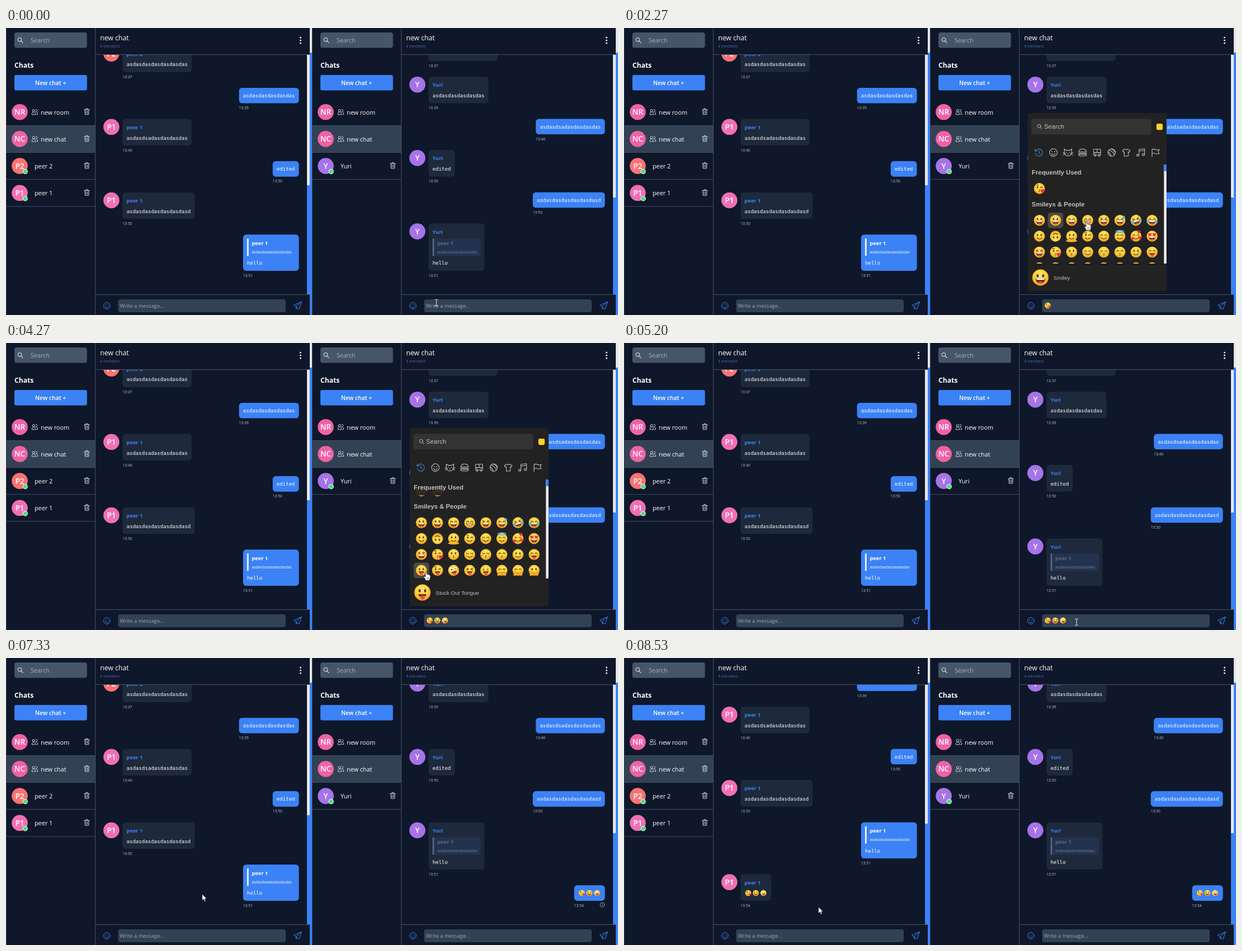
These frames come from a looping animation (1092x513 px, 9990 ms). An HTML page:

```html
<!DOCTYPE html>
<html lang="en">
<head>
<meta charset="utf-8">
<title>Group chat</title>
<style>
html, body { margin: 0; width: 100%; height: 100%; overflow: hidden; background: #0f172a; }
svg { display: block; width: 100vw; height: 100vh; }
text { font-family: "Open Sans", "Noto Sans", sans-serif; white-space: pre; }
.mono { font-family: "DejaVu Sans Mono", "Noto Sans Mono", monospace; }
.arial { font-family: "Liberation Sans", Arial, sans-serif; }
.b { font-weight: 700; }
.sb { font-weight: 600; }
.mid { text-anchor: middle; }
.ln { fill: none; stroke-linecap: round; stroke-linejoin: round; }
</style>
</head>
<body>
<svg id="stage" viewBox="0 0 1092 513">
  <defs>
    <radialGradient id="skin" cx=".5" cy=".35" r=".68">
      <stop offset="0" stop-color="#ffe96c"/><stop offset=".6" stop-color="#ffcb35"/><stop offset="1" stop-color="#ee9716"/>
    </radialGradient>
    <clipPath id="feedClip"><rect x="160" y="48" width="377" height="428"/></clipPath>
    <clipPath id="gridClip"><rect x="720" y="244" width="243" height="177"/></clipPath>
    <g id="faces"></g>
  </defs>
  <g id="shell"></g>
  <g id="left"></g>
  <g id="right" transform="translate(546)"></g>
  <g id="draft"></g>
  <g id="picker"></g>
  <g id="cursor"></g>
</svg>
<script>
const LOOP = 9990, STEP = 66.6;
const BLUE = '#3b82f6', LINE = '#475569', GREY = '#c0c0c0', BROWN = '#5a3416';
const $ = id => document.getElementById(id);
const many = (n, fn) => Array.from({ length: n }, (_, i) => fn(i)).join('');

const rect = (x, y, w, h, fill, r = 0) =>
  `<rect x="${x}" y="${y}" width="${w}" height="${h}" rx="${r}" fill="${fill}"/>`;
const disc = (x, y, r, fill, more = '') => `<circle cx="${x}" cy="${y}" r="${r}" fill="${fill}" ${more}/>`;
const oval = (x, y, rx, ry, fill = BROWN, more = '') =>
  `<ellipse cx="${x}" cy="${y}" rx="${rx}" ry="${ry}" fill="${fill}" ${more}/>`;
const text = (x, y, s, size, fill = '#fff', cls = '') =>
  `<text x="${x}" y="${y}" font-size="${size}" fill="${fill}" class="${cls}">${s}</text>`;
const line = (d, color = BROWN, w = 1.2) =>
  `<path class="ln" d="${d}" stroke="${color}" stroke-width="${w}"/>`;
const fill = (d, color) => `<path d="${d}" fill="${color}"/>`;
const at = (x, y, html, s = 1) => `<g transform="translate(${x} ${y}) scale(${s})">${html}</g>`;
const heart = (x, y, s) => at(x, y, fill('M0 3.4C-6-1-2.6-5 0-1.9C2.6-5 6-1 0 3.4Z', '#f0304a'), s);
const star = (x, y) => at(x, y, fill('M0-3.2L.9-1 3.2-.9 1.4.6 2 2.9 0 1.6-2 2.9-1.4.6-3.2-.9-.9-1Z', '#d8452a'));
const drop = (x, y, s = 1) => at(x, y, fill('M0-3Q4 2.6 0 2.8Q-4 2.6 0-3Z', '#4fb4f5'), s);

// Emoji faces, radius 10, assembled from one-letter parts
const dot = x => oval(x, -2.2, 1.3, 2);
const hand = (x, y, rx, ry, turn = 0) =>
  oval(x, y, rx, ry, '#fbb52c', `stroke="#c87812" stroke-width=".7" transform="rotate(${turn} ${x} ${y})"`);
const PARTS = {
  d: dot(-3.4) + dot(3.4),
  '^': line('M-5.6-1.2Q-3.6-4.6-1.6-1.2M1.6-1.2Q3.6-4.6 5.6-1.2'),
  x: line('M-5.6-4L-2-2.2L-5.6-.4M5.6-4L2-2.2L5.6-.4'),
  w: dot(-3.4) + line('M1.6-1.6Q3.6-3.8 5.8-1.8M-5.4-6Q-3.6-7-2-6'),
  c: line('M-5.6-2.4Q-3.6-.2-1.6-2.4M1.6-2.4Q3.6-.2 5.6-2.4'),
  l: line('M-5.4-2H-1.8M1.8-2H5.4'),
  h: heart(-4, -2.6, .95) + heart(4, -2.6, .95),
  s: star(-4, -2.6) + star(4, -2.6),
  z: disc(-3.6, -2.4, 3.2, '#fff') + disc(3.8, -2.6, 2.3, '#fff') + disc(-3.2, -2.2, 1.4, BROWN) + disc(4, -2.4, .9, BROWN),
  $: text(-5.4, 1, '$', 6, '#2f7d32', 'b') + text(1.8, 1, '$', 6, '#2f7d32', 'b'),
  O: fill('M-6 1H6C5.6 9.6-5.6 9.6-6 1Z', '#6b2a12') + fill('M-5.4 1H5.4L4.6 3H-4.6Z', '#fff') + oval(0, 6, 2.7, 1.2, '#ef4f5f'),
  G: fill('M-6 1.2H6C5.4 7.6-5.4 7.6-6 1.2Z', '#fff') + line('M-6 1.2H6C5.4 7.6-5.4 7.6-6 1.2ZM-5 3.6H5', BROWN, .8),
  S: line('M-4.2 3.2Q0 6.8 4.2 3.2'),
  K: line('M-.8 2.2Q2.4 2.6.2 4Q2.4 5.2-.8 5.8', BROWN, 1),
  L: fill('M-5 2H5C4.4 7-4.4 7-5 2Z', '#6b2a12') + fill('M-2.4 4H2.8V7.2Q.2 10.4-2.4 7.2Z', '#f0486a'),
  F: line('M-3.8 4H3.8'),
  Z: line('M-6 4H6', '#8f979f', 2) + disc(5.6, 4.6, 1.8, '#c9ced3'),
  k: heart(6.2, 4.6, 1.15),
  p: drop(7.4, -5.6, 1.2),
  t: drop(-7.6, 1.8, 1.2) + drop(7.6, 1.8, 1.2),
  y: drop(4.6, 2, .8),
  q: oval(-6.2, 2, 2, 1.5, '#f0764a', 'opacity=".55"') + oval(6.2, 2, 2, 1.5, '#f0764a', 'opacity=".55"'),
  a: oval(0, -8.6, 7, 2, 'none', 'stroke="#45b5f2" stroke-width="1.7"'),
  v: heart(-7, 5, .9) + heart(7.4, 3, 1) + heart(5, -7.6, .9),
  m: oval(0, 8.6, 10.4, 2.2, '#f6b526'),
  o: hand(-4, 6.6, 4.6, 2.5, -25) + hand(4, 6.8, 4.2, 2.4, 20),
  j: oval(0, 5.6, 1.6, 1) + hand(-5, -3, 2, 5.6, 20) + hand(-2, -2, 1.9, 6, 8) + hand(5, -1, 2, 6, -16) + hand(1, 1, 5, 2.6, -14),
  f: hand(0, 5, 1.4, 4.4) + hand(1.2, 8.6, 3.8, 2.2),
  e: hand(-3, 7.4, 4.2, 2.4, -12) + hand(-5.4, 5, 1.4, 3) + line('M1.6-6.4Q3.8-7.8 5.6-6'),
  u: hand(-5, -4.6, 6, 2.3, 28),
  B: line('M-5.6-6H-2M1.8-7Q3.8-8.8 5.8-7')
};
const SPECS = ('dO dO ^O ^G xO ^Op xORt ^Ot dS dSU dSm wS ^Sq ^Sa ^Sqv hO sO wKk dK cSq cKq ^K dSy ^Lq ' +
  'dL wL zLR xL $L ^So ^qo dqo dj df dFe dFu dZ dFB dF lF d D M dS lF dF dG cF').split(' ');
const KISS = 17, LAUGH = 4, ZANY = 26, PICKS = [KISS, LAUGH, ZANY];

function face(spec, i) {
  const turn = spec.includes('U') ? 180 : spec.includes('R') ? -16 : 0;
  const base = spec === 'D' ? disc(0, 0, 9, 'none', 'stroke="#f6bd2d" stroke-width="1.6" stroke-dasharray="3 2"')
    : disc(0, 0, 10, spec === 'M' ? '#aeb4ba' : 'url(#skin)');
  return `<g id="e${i}"><g transform="rotate(${turn})">${base}${[...spec].map(c => PARTS[c] || '').join('')}</g></g>`;
}
const emoji = (i, x, y, s = .98) => `<use href="#e${i}" transform="translate(${x} ${y}) scale(${s})"/>`;
const trio = (x, y, n = 3) => PICKS.slice(0, n).map((e, i) => emoji(e, x + i * 13.6, y, .54)).join('');

// People and messages
const PEOPLE = {
  P1: { name: 'peer 1', color: '#f16fb5' },
  P2: { name: 'peer 2', color: '#fb7272' },
  Y: { name: 'Yuri', color: '#a673e8' }
};
const QUOTED = 'asdasdsadasdasdasdas';
const LOG = [
  { by: 'P2', body: 'asdasdasdasdasdasdas', time: '13:37' },
  { by: 'Y', body: 'asdasdasdasdasdas', time: '13:39' },
  { by: 'P1', body: QUOTED, time: '13:40' },
  { by: 'Y', body: 'edited', time: '13:50' },
  { by: 'P1', body: 'asdasdasdasdasdasdasd', time: '13:50' },
  { by: 'Y', body: 'hello', time: '13:51', quote: true },
  { by: 'P1', body: '', time: '13:54' }
];

const avatar = (x, y, label, color) => disc(x, y, 14.3, color) + text(x, y + 5, label, 13.7, '#fff', 'sb mid');
const glass = (x, y, r, color, w) =>
  at(x, y, `<circle r="${r}" class="ln" stroke="${color}" stroke-width="${w}"/>` + line(`M${r * .7} ${r * .7}l${r} ${r}`, color, w));
const smiley = (r, c, w) => `<circle r="${r}" class="ln" stroke="${c}" stroke-width="${w}"/>` +
  disc(-r * .36, -r * .25, r * .14, c) + disc(r * .36, -r * .25, r * .14, c) +
  line(`M${-r * .5} ${r * .25}Q0 ${r * .95} ${r * .5} ${r * .25}`, c, w);

function chatRow(i, label, name, opts = {}) {
  const y = 150.2 + i * 48.2;
  const color = opts.group ? '#f062a6' : PEOPLE[label].color;
  let s = opts.on ? rect(0, y - 24.4, 159, 48.2, '#334155') + rect(0, y - 24.4, 159, .9, LINE) : '';
  if (i) s += rect(0, y + 23.6, 159, .9, LINE);
  s += avatar(24.5, y, label, color);
  if (opts.group) {
    s += at(51.4, y, line('M-5.2 4.2Q-5-.2-2-.2T1.2 4.2ZM2.4-.2Q5.2-.2 5.2 4.2H3', '#dbe3ec', .9) +
      line('M-4.2-2.6a2.1 2.1 0 1 0 4.2 0a2.1 2.1 0 1 0-4.2 0M1.6-4.6a2.1 2.1 0 1 1 0 4', '#dbe3ec', .9));
  } else s += disc(34.2, y + 10, 4.1, '#4ade80', 'stroke="#fff" stroke-width="1"');
  s += text(opts.group ? 62 : 51, y + 4.3, name, 10.8);
  if (opts.bin) s += at(144.2, y - .8, line('M-4.6-3.4H4.6M-1.6-3.6V-5.2H1.6V-3.6M-3.7-3.2L-3.1 5.2H3.1L3.7-3.2M-1.3-1.2V3.2M1.3-1.2V3.2', '#e2e8f0', .9));
  return s;
}

function panel(rows) {
  return rect(0, 0, .8, 513, '#334155') + rows +
    rect(15, 8, 129.5, 27.6, LINE, 4) + glass(24.5, 20.8, 3.3, '#e2e8f0', 1.1) + text(44, 26, 'Search', 10.7, '#a3b0c2') +
    text(15, 70.6, 'Chats', 12.1, '#fff', 'b') +
    rect(15, 84, 129.5, 27.6, BLUE, 3) + text(79.5, 101.8, 'New chat +', 10.3, '#fff', 'sb mid') +
    rect(158.8, 0, 1, 513, LINE) + rect(159, 47, 383, 1, LINE) + rect(159, 476, 383, 1, LINE) +
    text(168, 22, 'new chat', 12.2) + text(168, 35, '4 members', 6.6, '#4a6db4') +
    many(3, i => disc(525.6, 17.2 + i * 5, 1.4, '#fff')) +
    at(180, 496.5, smiley(5.8, BLUE, 1)) +
    rect(200, 485, 299, 23, '#334155', 4) +
    at(520, 496, line('M7-6.4L-6.6-.4L-2.4 2.2L2.6 6.6ZM7-6.4L-2.4 2.2V6.4L0 4.4', BLUE, 1)) +
    rect(542, 0, 4, 513, '#e6e6e6') + rect(542, 44, 4, 469, BLUE);
}

function bubble(m, me, bottom, pending) {
  const own = m.by === me, who = PEOPLE[m.by];
  const h = 27.6 + (own ? 0 : 20) + (m.quote ? 37 : 0);
  const w = m.quote ? 99.6 : m.body ? m.body.length * 5.46 + 14 : 54.8;
  const x = own ? 522.6 - w : 208, top = bottom - h;
  let s = rect(x, top, w, h, own ? BLUE : '#1e293b', 5.5);
  if (!own) s += avatar(188, top + 14.3, m.by, who.color) + text(x + 7, top + 18.2, who.name, 9.3, BLUE, 'b');
  if (m.quote) {
    const q = top + (own ? 7 : 27);
    if (!own) s += rect(x + 7, q, 86, 31, '#23334f');
    s += rect(x + 7, q, 3, 31, own ? '#e5ecf6' : '#53627a') +
      text(x + 15.4, q + 11.3, PEOPLE.P1.name, 9.4, own ? '#fff' : '#596981', 'b') +
      text(x + 15.4, q + 26.2, QUOTED, 6.55, own ? '#fff' : '#6f7f96');
  }
  s += m.body ? text(x + 7, bottom - 10.5, m.body, 9.07, '#fff', 'mono') : trio(x + 13.6, bottom - 13.8);
  s += text(x, bottom + 10.7, m.time, 6.7, '#bcc5d1');
  if (pending) s += at(518, bottom + 7.2, '<circle r="3.9" class="ln" stroke="#a9b4c3" stroke-width=".8"/>' + line('M0-2.3V0L1.6 1', '#a9b4c3', .8));
  return { s, h };
}

function feed(me, count, thumb, pending) {
  let bottom = 433.9, out = '';
  for (let i = count - 1; i >= 0 && bottom > 40; i--) {
    const b = bubble(LOG[i], me, bottom, pending && i === count - 1);
    out += b.s;
    bottom -= b.h + 28;
  }
  return `<g clip-path="url(#feedClip)">${out}</g>` + rect(537, 48, 5, 428, '#e6e6e6') + rect(537, thumb, 5, 476 - thumb, BLUE);
}

const draft = n => n ? trio(756, 496, n) : text(749, 499.6, 'Write a message...', 9.3, '#9aa6b6');

// Emoji picker
const TABS = [
  'M-5.6-3A6.4 6.4 0 1 1-6.2 1.6M-6.6-6V-2.6H-3.2M0-3.6V.4L2.8 2',
  '',
  'M-6.6-6.4L-3.6-4H3.6L6.6-6.4V1Q5 6 0 6T-6.6 1ZM-3-.6V.4M3-.6V.4M-1 2.4H1M-9 .4L-5 1.4M9 .4L5 1.4M-8.6 4.2L-5 3M8.6 4.2L5 3',
  'M-6.8-1.4Q-6-6.4 0-6.4T6.8-1.4ZM-7.2 1H7.2M-6.8 3H6.8V4Q6.8 6.2 4.6 6.2H-4.6Q-6.8 6.2-6.8 4Z',
  'M-6.2-5.8H6.2V4.4H-6.2ZM-6.2 0H6.2M0-5.8V0M-4.6 4.6V6.4H-2.6V4.6M2.6 4.6V6.4H4.6V4.6M-4 2.2H-3M3 2.2H4',
  'M-6.6 0a6.6 6.6 0 1 0 13.2 0a6.6 6.6 0 1 0-13.2 0M-5-4.4Q2-2.4 5 4.4M-1-6.4Q5-4 6.4 1M-6.4-1Q-3 0-1 6.4',
  'M-2.6-6.2Q0-3.4 2.6-6.2L6.8-3.6L5.2-.6L3.6-1.4V6.4H-3.6V-1.4L-5.2-.6L-6.8-3.6Z',
  'M-3.4 4.6V-5.6L6.6-6.8V3.4M-3.4-2.6L6.6-3.8M-7.6 4.8a2.1 1.7 0 1 0 4.2 0a2.1 1.7 0 1 0-4.2 0M2.4 3.6a2.1 1.7 0 1 0 4.2 0a2.1 1.7 0 1 0-4.2 0',
  'M-6 7V-5.6Q-3-7 0-5.4T6.8-5.6L5-1.6L6.6 1.8Q3 3 0 1.8T-6 1.8'
];
const HOVERS = [
  [1270, 32, 'Face With Peeking Eye'], [1530, KISS, 'Kissing Heart'], [2000, 1, 'Smiley'],
  [2460, LAUGH, 'Laughing'], [3330, 20, 'Kissing Closed Eyes'], [3790, ZANY, 'Zany Face'], [4190, 24, 'Stuck Out Tongue']
];
const ease = (t, a, b) => { const u = Math.min(1, Math.max(0, (t - a) / (b - a))); return u * u * (3 - 2 * u); };
const stage = (t, times) => times.filter(x => t >= x).length;

function picker(t) {
  if (t < 1260 || t >= 5190) return '';
  const used = stage(t, [1930, 3260, 4390]);
  const shift = (used ? 56.8 : 0) - 22.5 * ease(t, 3330, 3730);
  const [since, hot, label] = HOVERS[Math.max(0, stage(t, HOVERS.map(h => h[0])) - 1)];
  const colX = i => 741.2 + (i % 8) * 28.73;
  const rowY = i => 286.9 + shift + Math.floor(i / 8) * 28.4;
  const head = (y, s) => text(727.6, y, s, 11.3, GREY, 'arial b');
  let grid = since > 1270 ? rect(colX(hot) - 13.8, rowY(hot) - 13.8, 27.6, 27.6, '#4a4a4a', 5) : '';
  grid += many(SPECS.length, i => emoji(i, colX(i), rowY(i)));
  if (used) grid += PICKS.slice(0, used).map((e, i) => emoji(e, colX(i), 230.1 + shift)).join('') + head(262 + shift, 'Smileys &amp; People');
  grid += `<g opacity=".92">${rect(720, 244, 243, 28.4, '#222')}</g>` + head(262, used ? 'Frequently Used' : 'Smileys &amp; People');
  return rect(720.5, 152, 247.5, 318.5, '#222', 4) +
    rect(727, 162.5, 214, 28, '#333', 4) + glass(740.8, 175.4, 3, GREY, 1) + text(749.4, 180.4, 'Search', 11.4, GREY, 'arial') +
    rect(950, 171, 11.2, 11.2, '#ffd225', 2.4) +
    TABS.map((d, i) => {
      const c = used && !i ? '#3f8bd0' : GREY;
      return at(740.2 + i * 26, 222.6, d ? line(d, c, 1.1) : smiley(6.8, c, 1.1));
    }).join('') +
    `<g clip-path="url(#gridClip)">${grid}</g>` +
    rect(963.4, 244, 4.6, 177, '#e9e9e9') + rect(963.4, 244, 4.6, used ? 12 : 17, BLUE) +
    rect(720.5, 421, 247.5, .8, '#191919') + emoji(hot, 743, 446, 1.45) + text(766.6, 449.6, label, 9.8, GREY, 'arial');
}

// Pointer
const TRACK = [
  [0, 768, 491], [466, 734, 500], [800, 734, 500], [930, 721, 497], [1130, 804.5, 358], [1400, 804.5, 358],
  [1670, 770, 344], [2000, 770, 344], [2400, 846, 346], [2600, 857, 345], [3000, 857, 345], [3195, 863, 406],
  [3600, 834, 398], [3995, 800, 408], [4130, 800, 408], [4262, 749.6, 408], [4400, 749.6, 408], [5060, 800, 499],
  [5130, 800, 499], [5794, 1081, 495], [5930, 1081, 495], [6060, 1073, 496], [6260, 1073, 496], [6860, 350, 422],
  [7400, 350, 422], [7700, 310, 478], [7990, 212, 432], [8525, 347, 445], [LOOP, 347, 445]
];
const SHAPES = {
  beam: line('M-2.4-5.6H-.7L0-5L.7-5.6H2.4M0-5V5M-2.4 5.6H-.7L0 5L.7 5.6H2.4', '#e8e8e8', 1),
  arrow: '<path d="M0 0V11.6L2.7 9.1L4.6 13.3L6.5 12.5L4.7 8.3H8.2Z" fill="#fff" stroke="#111" stroke-width=".7"/>',
  hand: '<path d="M-1.3 1Q0-1 1.3 1V5.4Q2.7 4.6 3.5 6Q5 5.2 5.8 6.8Q7.5 6.4 7.5 8.4V11.6Q7.2 13.6 6 16.4H-.6Q-2.4 12.6-4 10.4Q-4.4 8-1.3 10Z" fill="#fff" stroke="#222" stroke-width=".8"/>' +
    line('M1.4 11V14M3.2 11V14M5 11V14', '#555', .6)
};

function cursor(t) {
  const i = TRACK.findIndex(k => k[0] > t), [t0, x0, y0] = TRACK[i - 1], [t1, x1, y1] = TRACK[i];
  const u = ease(t, t0, t1), x = x0 + (x1 - x0) * u, y = y0 + (y1 - y0) * u;
  const within = (a, b, c, d) => x >= a && x <= b && y >= c && y <= d;
  const open = t >= 1260 && t < 5190;
  let kind = 'arrow';
  if (open && within(720, 968, 152, 470) || within(718, 735, 485, 508) || within(1056, 1076, 485, 508)) kind = 'hand';
  else if (within(746, 1045, 485, 508)) kind = 'beam';
  return at(x, y, SHAPES[kind]);
}

const last = {};
function put(id, html) {
  if (last[id] !== html) $(id).innerHTML = last[id] = html;
}

function render(ms) {
  const t = Math.floor((ms + 4) / STEP) * STEP % LOOP;
  const sent = t >= 6260, arrived = t >= 7520;
  put('left', feed('Y', arrived ? 7 : 6, arrived ? 296 : 281, false));
  put('right', feed('P1', sent ? 7 : 6, sent ? 313 : 303, sent && !arrived));
  put('draft', draft(sent ? 0 : stage(t, [1860, 2660, 4120])));
  put('picker', picker(t));
  put('cursor', cursor(t));
}

const rooms = bin => chatRow(0, 'NR', 'new room', { group: 1, bin }) + chatRow(1, 'NC', 'new chat', { group: 1, on: 1, bin });
const contact = (i, id) => chatRow(i, id, PEOPLE[id].name, { bin: 1 });
put('faces', SPECS.map(face).join(''));
put('shell', panel(rooms(1) + contact(2, 'P2') + contact(3, 'P1')) + text(203, 499.6, 'Write a message...', 9.3, '#9aa6b6') +
  at(546, 0, panel(rooms(0) + contact(2, 'Y'))));

const start = performance.now();
function tick() {
  render((performance.now() - start) % LOOP);
  requestAnimationFrame(tick);
}
tick();
</script>
</body>
</html>
```
